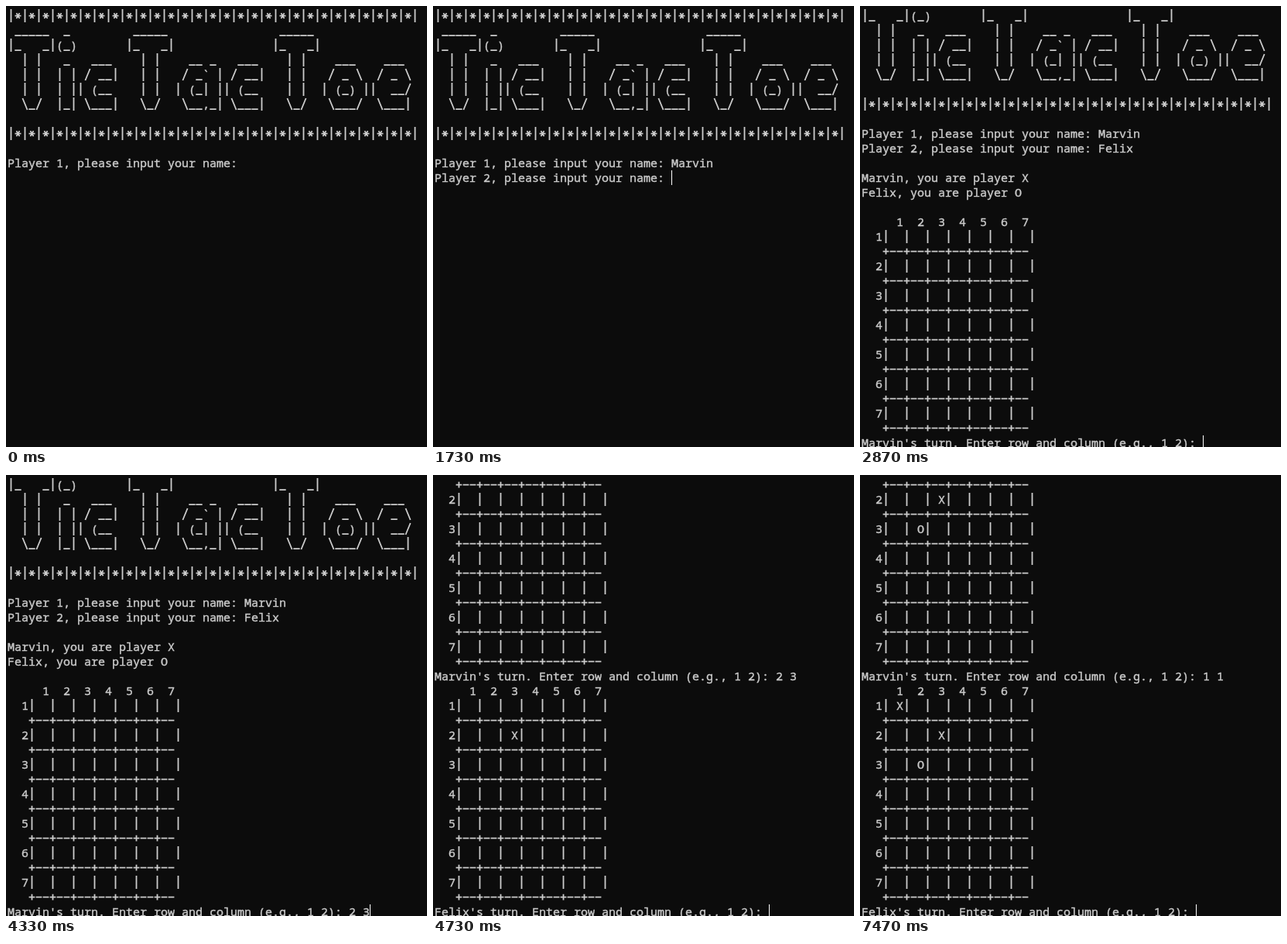
Write an HTML page that moves like this. It is 544 px wide and 569 px high and loops after 8 s.

```html
<!DOCTYPE html>
<html lang="en">
<head>
<meta charset="utf-8">
<title>Tic Tac Toe terminal</title>
<style>
  html, body { margin: 0; width: 100%; height: 100%; overflow: hidden; background: #0c0c0c; }
  svg { display: block; }
  text {
    font: 15px "Noto Sans Mono", monospace;
    font-variant-ligatures: none;
    white-space: pre;
    fill: #ccc;
    stroke: #ccc;
    stroke-width: .4px;
  }
</style>
</head>
<body>
<svg id="stage" width="544" height="569" viewBox="0 0 544 569">
  <rect width="544" height="569" fill="#0c0c0c"/>
  <g id="rows"></g>
  <path id="marks" fill="none" stroke="#ccc" stroke-width="1.8"/>
  <rect id="caret" width="1" height="19" fill="#fff"/>
  <path id="mouse" d="M0 0V14.5L3.3 11.4L5.7 17.4L8.2 16.3L5.8 10.5H10Z" fill="#fff"/>
</svg>
<script>
const LOOP = 8000, ROWS = 30, LEFT = 2, TOP = 3, CW = 9, CH = 19, BASE = 15;
const $ = id => document.getElementById(id);

const stars = '|*'.repeat(29) + '|';
const title = [
  stars,
  String.raw` _____  _         _____                _____`,
  String.raw`|_   _|(_)       |_   _|              |_   _|`,
  String.raw`  | |   _   ___    | |    __ _   ___    | |    ___    ___`,
  String.raw`  | |  | | / __|   | |   / _~ | / __|   | |   / _ \  / _ \ `.replace('~', '`'),
  String.raw`  | |  | || (__    | |  | (_| || (__    | |  | (_) ||  __/`,
  String.raw`  \_/  |_| \___|   \_/   \__,_| \___|   \_/   \___/  \___|`,
  '', stars, ''
];

// Board as printed lines; moves maps "row col" to a mark.
function board(moves) {
  const cols = [1, 2, 3, 4, 5, 6, 7];
  const out = ['   ' + cols.map(c => '  ' + c).join('')];
  for (const r of cols) {
    out.push(`  ${r}|` + cols.map(c => ` ${moves[r + ' ' + c] || ' '}|`).join(''));
    out.push('   ' + '+--'.repeat(7));
  }
  return out;
}

const one = 'Marvin', two = 'Felix';
const ask = n => `Player ${n}, please input your name: `;
const turn = who => `${who}'s turn. Enter row and column (e.g., 1 2): `;

// Each step: prompt, typed reply, time of each key, time of Enter, lines printed next.
const steps = [
  { prompt: ask(1), reply: one, at: [1130, 1270, 1330, 1400, 1470, 1600], enter: 1730, print: [] },
  { prompt: ask(2), reply: two, at: [2130, 2330, 2470, 2600, 2600], enter: 2870,
    print: ['', `${one}, you are player X`, `${two}, you are player O`, '', ...board({})] },
  { prompt: turn(one), reply: '2 3', at: [3930, 4070, 4330], enter: 4670,
    print: board({ '2 3': 'X' }) },
  { prompt: turn(two), reply: '3 2', at: [5330, 5600, 5930], enter: 6330,
    print: board({ '2 3': 'X', '3 2': 'O' }) },
  { prompt: turn(one), reply: '1 1', at: [6800, 6930, 7270], enter: 7470,
    print: board({ '2 3': 'X', '3 2': 'O', '1 1': 'X' }) },
  { prompt: turn(two), reply: '', at: [], enter: Infinity, print: [] }
];

const caretOff = [[0, 330], [870, 1070], [3470, 3930], [4670, 4730], [5270, 5330]];

// Pointer keys: time, x, y
const pointer = [[70, 534, 526], [330, 502, 428], [440, 502, 428], [530, 505, 412], [1130, 505, 412]];

// Stroked terminal symbols, drawn from the cell's left edge and baseline.
const marks = {
  '|': (x, y) => `M${x + 4.5} ${y - 14}v17`,
  '_': (x, y) => `M${x + .3} ${y + 1.2}h8.4`,
  '-': (x, y) => `M${x + .6} ${y - 5.4}h7.8`,
  '+': (x, y) => `M${x + .6} ${y - 5.4}h7.8M${x + 4.5} ${y - 9.3}v7.8`,
  '*': (x, y) => `M${x + .5} ${y - 5.4}h8M${x + 2.5} ${y - 8.9}l4 7m0 -7l-4 7`,
  '/': (x, y) => `M${x + 7.6} ${y - 13}l-6.2 15`,
  '\\': (x, y) => `M${x + 1.4} ${y - 13}l6.2 15`
};

const rows = Array.from({ length: ROWS }, (_, i) => {
  const el = document.createElementNS('http://www.w3.org/2000/svg', 'text');
  el.setAttribute('x', LEFT);
  el.setAttribute('y', TOP + i * CH + BASE);
  return $('rows').appendChild(el);
});

function screen(t) {
  const lines = [...title];
  for (const s of steps) {
    lines.push(s.prompt + s.reply.slice(0, s.at.filter(k => k <= t).length));
    if (t < s.enter) break;
    lines.push(...s.print);
  }
  return lines.slice(-ROWS);
}

function pointerAt(t) {
  const i = pointer.findIndex(k => t < k[0]);
  if (i < 1) return null;
  const [t0, x0, y0] = pointer[i - 1], [t1, x1, y1] = pointer[i];
  const p = (t - t0) / (t1 - t0);
  return [x0 + (x1 - x0) * p, y0 + (y1 - y0) * p];
}

const show = (el, on) => el.setAttribute('visibility', on ? 'visible' : 'hidden');

let last = '';
function drawLines(lines) {
  const key = lines.join('\n');
  if (key === last) return;
  last = key;
  let d = '';
  rows.forEach((el, r) => {
    const line = lines[r] || '';
    el.textContent = line.replace(/[|_+*\/\\-]/g, ' ');
    [...line].forEach((ch, c) => {
      if (marks[ch]) d += marks[ch](LEFT + c * CW, TOP + r * CH + BASE);
    });
  });
  $('marks').setAttribute('d', d);
}

function draw(t) {
  const lines = screen(t);
  drawLines(lines);

  const end = lines.length - 1;
  $('caret').setAttribute('x', LEFT + lines[end].length * CW);
  $('caret').setAttribute('y', TOP + end * CH);
  show($('caret'), !caretOff.some(([a, b]) => t >= a && t < b));

  const pos = pointerAt(t);
  show($('mouse'), pos);
  if (pos) $('mouse').setAttribute('transform', `translate(${pos})`);
}

const start = performance.now();
function tick(now) {
  draw(Math.max(0, now - start) % LOOP);
  requestAnimationFrame(tick);
}
draw(0);
requestAnimationFrame(tick);
</script>
</body>
</html>
```
